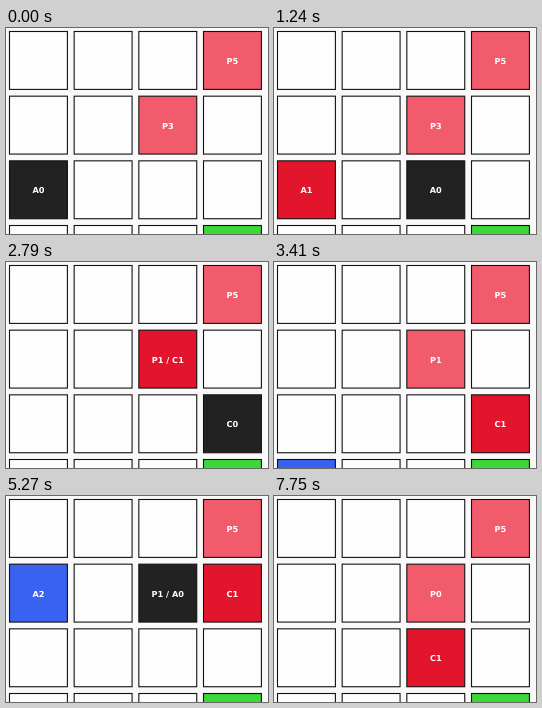
An HTML page for the animation above (8 s loop, 262 by 206 pixels).

```html
<!DOCTYPE html>
<html lang="en">
<head>
<meta charset="utf-8">
<title>Agents on a grid</title>
<style>
  html, body { margin: 0; width: 100%; height: 100%; overflow: hidden; background: #f9f9f9; }
  svg { display: block; }
  rect { stroke: #111; stroke-width: 1.1px; }
  text {
    fill: #fff; font: bold 8.2px "DejaVu Sans", sans-serif;
    text-anchor: middle; text-rendering: geometricPrecision;
  }
</style>
</head>
<body>
<svg id="grid" width="262" height="206" viewBox="0 0 262 206"></svg>
<script>
const STEP = 310, LOOP = 8000, LAST = 25;
const COUNT = 4, START = 2.95, PITCH = 64.67, SIZE = 59, LINE = 1.1, BASELINE = 3.4;
const EMPTY = '#fdfdfd', PILE = '#f25b6b', HOME = '#3cd838';

// Timelines: "step:value" pairs, each value holding until the next one.
const timeline = text => text.split(' ').map(p => p.split(':'));
const valueAt = (line, step) => line.reduce((v, [s, x]) => +s <= step ? x : v, '');

// Routes are column and row; "-" is out of view.
const agents = [
  { color: '#222222',
    route: timeline('0:02 1:12 3:22 6:21 8:31 9:32 10:33 11:- 14:23 15:22 17:21 19:11 21:10 22:00 23:-'),
    state: timeline('0:A 7:C 11:A 18:C') },
  { color: '#e3152c',
    route: timeline('0:- 2:03 4:02 5:12 7:22 8:21 10:31 11:32 12:31 13:30 16:31 21:30 22:31 24:32 25:22'),
    state: timeline('0:A 9:C') },
  { color: '#3a62f0',
    route: timeline('0:- 11:03 14:02 16:01 18:02 19:03 20:-'),
    state: timeline('0:A') }
];
const piles = { '30': timeline('0:5'), '21': timeline('0:3 7:2 9:1 18:0') };

const grid = document.getElementById('grid');
const cells = {};

function add(tag, attrs) {
  const node = document.createElementNS('http://www.w3.org/2000/svg', tag);
  for (const name in attrs) node.setAttribute(name, attrs[name]);
  return grid.appendChild(node);
}

for (let row = 0; row < COUNT; row++) {
  for (let col = 0; col < COUNT; col++) {
    const x = START + col * PITCH, y = START + row * PITCH;
    cells['' + col + row] = {
      box: add('rect', { x: x + LINE / 2, y: y + LINE / 2, width: SIZE - LINE, height: SIZE - LINE }),
      label: add('text', { x: x + SIZE / 2, y: y + SIZE / 2 + BASELINE })
    };
  }
}

function draw(step) {
  for (const key in cells) {
    const labels = [];
    let color = key === '33' ? HOME : EMPTY;
    if (piles[key]) {
      color = PILE;
      labels.push('P' + valueAt(piles[key], step));
    }
    agents.forEach((agent, id) => {
      if (valueAt(agent.route, step) !== key) return;
      color = agent.color;
      labels.push(valueAt(agent.state, step) + id);
    });
    cells[key].box.setAttribute('fill', color);
    cells[key].label.textContent = labels.join(' / ');
  }
}

let shown = -1;
function tick() {
  const step = Math.min(LAST, Math.floor(performance.now() % LOOP / STEP));
  if (step !== shown) draw(shown = step);
  requestAnimationFrame(tick);
}
tick();
</script>
</body>
</html>
```
